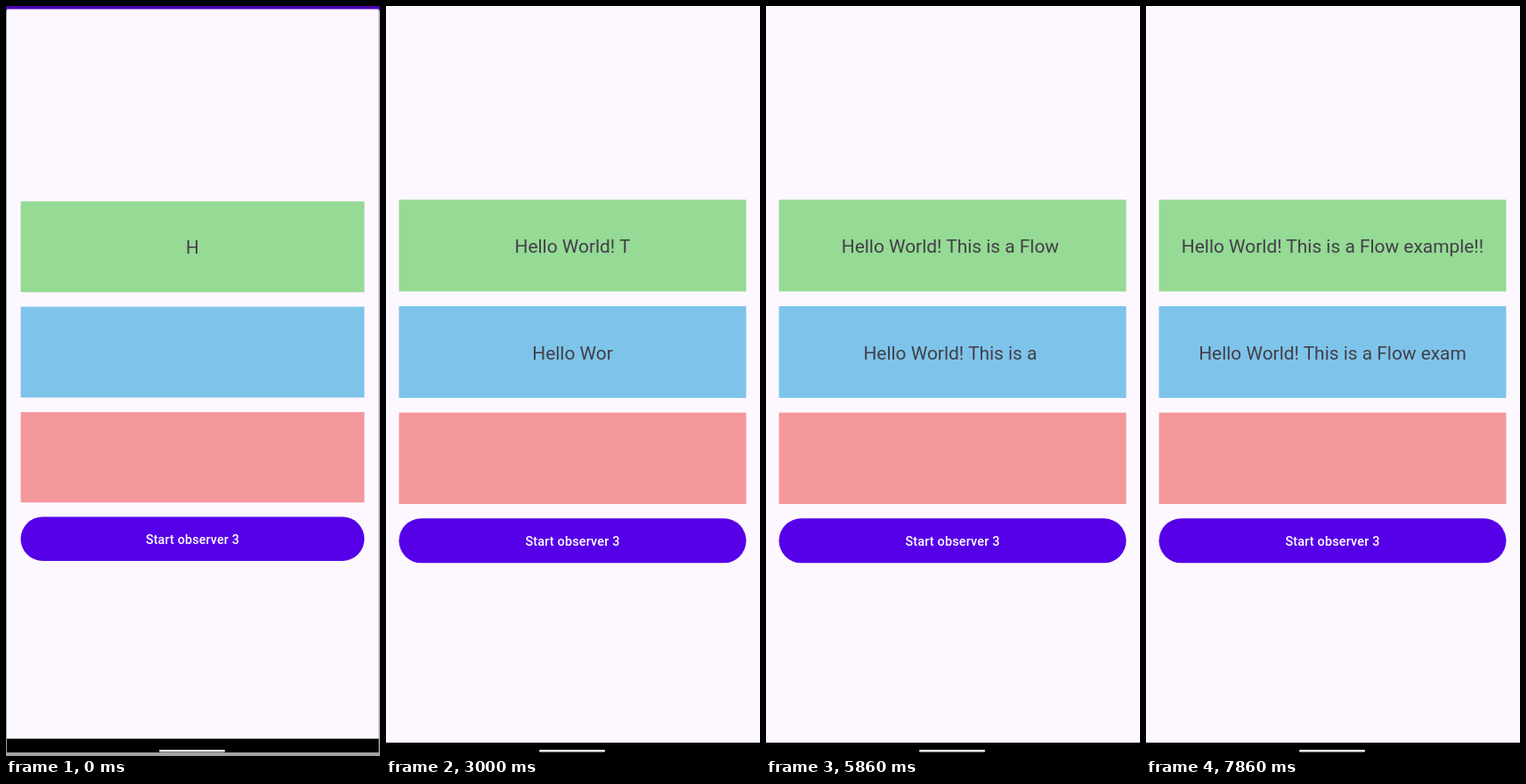
An HTML page that plays this animation: 420 by 842 pixels, repeating every 8 s.

```html
<!DOCTYPE html>
<html lang="en">
<head>
<meta charset="utf-8">
<title>Typing observers</title>
<style>
  html, body { margin: 0; width: 100%; height: 100%; overflow: hidden; background: #a2a3a6; }
  svg { display: block; width: 100%; height: 100%; }
  text { font-family: Roboto, sans-serif; text-anchor: middle; white-space: pre; }
  .typed { font-size: 20.9px; fill: #433f48; }
  .label { font-size: 14.4px; font-weight: 500; letter-spacing: .18px; fill: #fff; }
  /* The window settles to full size after its opening step. */
  .window { animation: settle 8s step-end infinite; }
  @keyframes settle {
    0% { transform: translate(2.15px, 4.1px) scale(.9897); }
    1.78%, 100% { transform: none; }
  }
</style>
</head>
<body>
<svg viewBox="0 0 420 842">
  <rect width="420" height="842" fill="#a2a3a6"/>
  <rect width="420" height="5" fill="#4a00b4"/>
  <g class="window">
    <rect x="-1.2" y="-.6" width="421.9" height="828" fill="#fdf8ff"/>
    <rect x="-1.2" y="827" width="421.9" height="15.6" fill="#000"/>
    <rect x="14.5" y="217.5" width="390" height="103" fill="#95da95"/>
    <rect x="14.5" y="337" width="390" height="103" fill="#7ec4ea"/>
    <rect x="14.5" y="456.5" width="390" height="102.5" fill="#f4989c"/>
    <rect x="14.5" y="575.3" width="390" height="50" rx="25" fill="#5600e8"/>
    <text id="first" class="typed" x="209.5" y="277.2"></text>
    <text id="second" class="typed" x="209.5" y="396.7"></text>
    <text class="label" x="209.5" y="605.8">Start observer 3</text>
  </g>
  <rect x="172" y="835" width="74" height="2.6" rx="1.3" fill="#f2f2f2"/>
</svg>
<script>
  const MESSAGE = "Hello World! This is a Flow example!!!";
  const LOOP = 8000;
  const STEP = LOOP / 56;
  const CHAR_TIME = 212;
  const LAG = 5;
  const first = document.getElementById("first");
  const second = document.getElementById("second");
  const settle = document.querySelector(".window").getAnimations()[0];

  function type(element, count) {
    const value = MESSAGE.slice(0, Math.max(0, count));
    if (element.textContent !== value) element.textContent = value;
  }

  function draw(now) {
    const elapsed = settle.currentTime ?? now;
    const time = Math.floor((elapsed % LOOP + 1) / STEP) * STEP;
    const count = Math.floor(time / CHAR_TIME + 1.2);
    type(first, count);
    type(second, count - LAG);
    requestAnimationFrame(draw);
  }
  draw(0);
</script>
</body>
</html>
```
